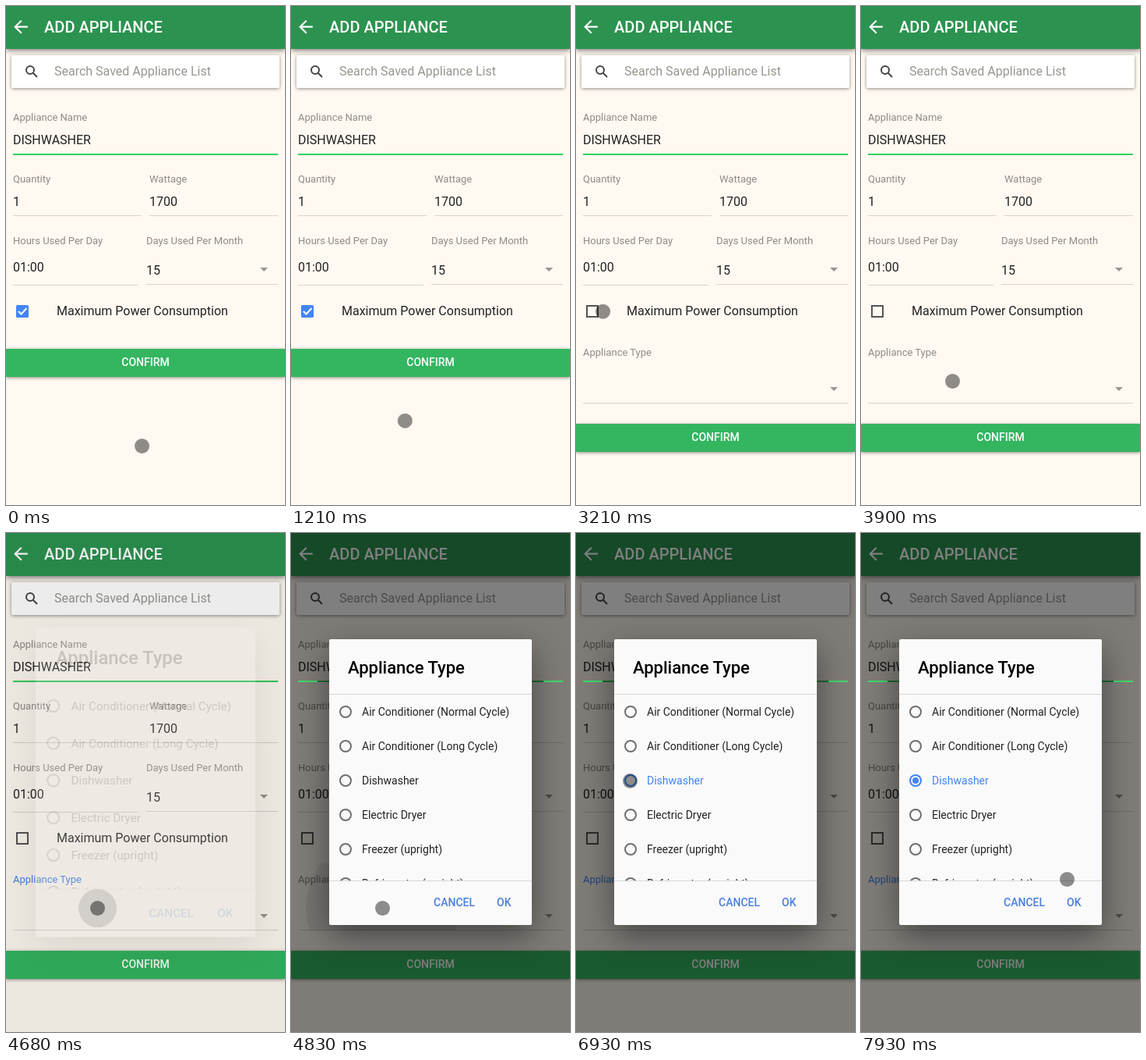
Animation of 358x639 px, one loop 8 s. Source, as an HTML page:

```html
<!DOCTYPE html>
<html lang="en">
<head>
<meta charset="utf-8">
<title>Add appliance</title>
<style>
  html, body { margin: 0; width: 100%; height: 100%; overflow: hidden; background: #fff9f1; }
  svg { display: block; width: 100%; height: 100%; font: 16px Roboto, sans-serif; fill: #222; }
  .label { font-size: 13px; fill: #8f8b86; }
  .focused { fill: #4285f4; }
  .line { fill: #d8d3cc; }
  .arrow { fill: #99958f; }
  .medium { font-weight: 500; }
  .button { font-size: 14px; font-weight: 500; }
  .action { fill: #4c7fdc; }
  .item { font-size: 14px; }
  .ring { fill: none; stroke: #6e6e6e; stroke-width: 2; }
  .ripple { fill: #555; }
  .header { filter: drop-shadow(0 2px 3px rgba(0, 0, 0, .5)); }
  .raised { filter: drop-shadow(0 1px 2px rgba(0, 0, 0, .45)); }
  .card { filter: drop-shadow(0 14px 20px rgba(0, 0, 0, .45)); }
  .chosen text { fill: #4285f4; }
  .chosen .ring { stroke: #4285f4; }
</style>
</head>
<body>
<svg viewBox="0 0 358 639">
  <defs>
    <clipPath id="checkRow"><rect y="368" width="358" height="46"/></clipPath>
    <clipPath id="typeRow"><rect y="423" width="358" height="86"/></clipPath>
    <clipPath id="listArea"><rect x="49" y="207" width="260" height="238"/></clipPath>
    <clipPath id="dishRow"><rect x="49" y="295" width="260" height="44"/></clipPath>
  </defs>

  <rect width="358" height="639" fill="#fff9f1"/>
  <rect class="header" width="358" height="55" fill="#2b934f"/>
  <path transform="translate(5.8 13.5) scale(1.1)" fill="#fff"
        d="M20 11H7.8l5.6-5.6L12 4l-8 8 8 8 1.4-1.4L7.8 13H20z"/>
  <text class="medium" x="49" y="34" font-size="20" fill="#fff">ADD APPLIANCE</text>

  <rect class="raised" x="7" y="63" width="344" height="42" rx="2" fill="#fff"/>
  <g fill="none" stroke="#444" stroke-width="2">
    <circle cx="31" cy="82" r="5"/><path d="M34.5 85.5l5.5 5.5"/>
  </g>
  <text x="62" y="89" fill="#99958f">Search Saved Appliance List</text>

  <g id="fields"></g>
  <rect x="9" y="189" width="340" height="2" fill="#32d060"/>

  <g clip-path="url(#checkRow)"><circle id="checkRipple" class="ripple" cx="18.5" cy="390.5"/></g>
  <rect id="unchecked" x="14" y="384" width="14" height="14" fill="none" stroke="#555" stroke-width="2"/>
  <g id="checked">
    <rect x="13" y="383" width="16" height="16" rx="1.5" fill="#4285f4"/>
    <path d="M16 391l3.5 3.5 7-7.5" fill="none" stroke="#fff" stroke-width="2"/>
  </g>
  <text x="65" y="396">Maximum Power Consumption</text>

  <g id="typeField">
    <text id="typeLabel" class="label" x="9" y="448">Appliance Type</text>
    <rect class="line" x="9" y="508" width="340" height="1"/>
    <path class="arrow" d="M326 488h10l-5 5z"/>
    <g clip-path="url(#typeRow)"><circle id="typeRipple" class="ripple" cx="117.5" cy="480.5"/></g>
  </g>

  <g id="confirm">
    <rect class="raised" y="439" width="358" height="36" fill="#34b560"/>
    <text class="button" x="179" y="461" text-anchor="middle" fill="#fff">CONFIRM</text>
  </g>

  <rect id="backdrop" width="358" height="639" fill="#000"/>
  <path id="glow" d="M9 189h25v2H9zM324 189h25v2h-25z" fill="#3edb6a"/>

  <g id="dialog">
    <rect class="card" x="49" y="136" width="260" height="366" rx="2" fill="#fafafa"/>
    <text class="medium" x="73" y="180" font-size="22" fill="#000">Appliance Type</text>
    <path d="M49 206.5h260M49 445.5h260" stroke="#d8d8d8"/>
    <g id="list" clip-path="url(#listArea)"></g>
    <g clip-path="url(#dishRow)"><circle id="dishRipple" class="ripple" cx="69.5" cy="317.5"/></g>
    <circle id="dot" cx="70" cy="317" fill="#4285f4"/>
    <text class="button action" x="183" y="478">CANCEL</text>
    <text class="button action" x="264" y="478">OK</text>
  </g>

  <circle id="cursor" r="9.5" fill="#000" fill-opacity=".44"/>
</svg>
<script>
const LOOP = 8000;
const $ = id => document.getElementById(id);
const show = (id, on) => { $(id).style.display = on ? '' : 'none'; };

// label, value, x, label baseline, value baseline, line y, line width, has arrow
const fields = [
  ['Appliance Name', 'DISHWASHER', 9, 147, 177, 189, 340],
  ['Quantity', '1', 9, 226, 256, 268, 165],
  ['Wattage', '1700', 184, 226, 256, 268, 165],
  ['Hours Used Per Day', '01:00', 9, 305, 340, 357, 161],
  ['Days Used Per Month', '15', 180, 305, 344, 356, 169, true]
];
$('fields').innerHTML = fields.map(([label, value, x, labelY, valueY, lineY, width, arrow]) => `
  <text class="label" x="${x}" y="${labelY}">${label}</text>
  <text x="${x}" y="${valueY}">${value}</text>
  <rect class="line" x="${x}" y="${lineY}" width="${width}" height="1"/>
  ${arrow ? '<path class="arrow" d="M326 335h10l-5 5z"/>' : ''}`).join('');

const kinds = ['Air Conditioner (Normal Cycle)', 'Air Conditioner (Long Cycle)', 'Dishwasher',
  'Electric Dryer', 'Freezer (upright)', 'Refrigerator (upright)'];
$('list').innerHTML = kinds.map((name, i) => `
  <g><circle class="ring" cx="70" cy="${229 + 44 * i}" r="7"/>
  <text class="item" x="91" y="${234 + 44 * i}">${name}</text></g>`).join('');
const dishwasher = $('list').children[2];

// start, end, number of steps, destination, optional curve control point
const home = [174.5, 563.5];
const moves = [
  [1060, 1830, 11, [19.5, 385.5]],
  [1980, 2060, 2, [18.5, 390.5]],
  [3210, 3900, 10, [117.5, 480.5], [102, 390]],
  [5460, 6230, 11, [72.5, 328.5], [42, 320]],
  [6300, 6380, 2, [74.5, 318.5]],
  [6530, 6610, 2, [69.5, 317.5]],
  [7470, 7930, 7, [264.5, 443.5]]
];

function cursorAt(t) {
  let from = home;
  for (const [start, end, steps, to, bend] of moves) {
    if (t < start) break;
    if (t >= end) { from = to; continue; }
    const u = (Math.floor((t - start) / (end - start) * (steps - 1)) + 1) / steps;
    return from.map((a, i) => {
      const c = bend ? bend[i] : (a + to[i]) / 2;
      return a * (1 - u) ** 2 + 2 * c * u * (1 - u) + to[i] * u * u;
    });
  }
  return from;
}

function ripple(id, t, start, duration) {
  const age = t - start;
  const on = age >= 0 && age < duration;
  show(id, on);
  if (!on) return;
  $(id).setAttribute('r', 24 + age * .49);
  $(id).setAttribute('opacity', .2 * (1 - age / duration));
}

const dialogSteps = [[4680, .15], [4750, .82], [4830, 1]];

function draw(t) {
  const expanded = t >= 2740;
  show('checked', !expanded);
  show('unchecked', expanded);
  show('typeField', expanded);
  $('confirm').setAttribute('transform', `translate(0 ${expanded ? 96 : 0})`);
  $('typeLabel').classList.toggle('focused', t >= 4600 && t < 4750 || t >= 4900);

  const open = dialogSteps.reduce((value, [at, next]) => t >= at ? next : value, 0);
  show('dialog', open > 0);
  show('glow', open === 1);
  $('backdrop').setAttribute('opacity', open * .5);
  $('dialog').setAttribute('opacity', open);
  $('dialog').setAttribute('transform',
    `translate(179 319) scale(${1.1 - .1 * open}) translate(-179 -319)`);

  dishwasher.classList.toggle('chosen', t >= 6930);
  $('dot').setAttribute('r', 4 * Math.min(1, Math.max(0, (t - 6930) / 230)));

  ripple('checkRipple', t, 2670, 310);
  ripple('typeRipple', t, 4680, 310);
  ripple('dishRipple', t, 7000, 160);

  const [x, y] = cursorAt(t);
  $('cursor').setAttribute('cx', x);
  $('cursor').setAttribute('cy', y);
}

const began = performance.now();
function tick() {
  draw((performance.now() - began) % LOOP);
  requestAnimationFrame(tick);
}
tick();
</script>
</body>
</html>
```
